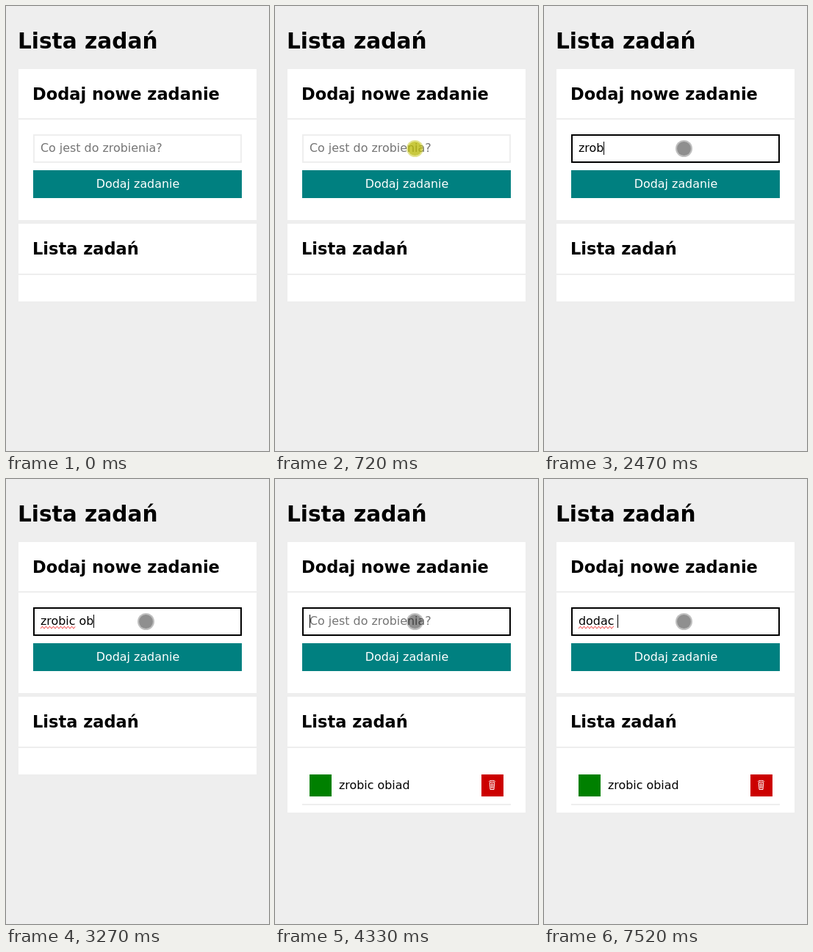
An HTML page with a canvas that plays this animation: 358x607 px, repeating every 7.99 s.

```html
<!DOCTYPE html>
<html lang="pl">
<head>
<meta charset="utf-8">
<title>Lista zadań</title>
<style>
  html, body { margin: 0; width: 100%; height: 100%; overflow: hidden; background: #eee; }
  canvas { display: block; width: 358px; height: 607px; }
</style>
</head>
<body>
<canvas id="stage"></canvas>
<script>
const W = 358, H = 607, LOOP = 7990;
const FOCUS = 790, ADDED = 4330;
const canvas = document.getElementById('stage');
const ratio = window.devicePixelRatio || 1;
canvas.width = W * ratio;
canvas.height = H * ratio;
const ctx = canvas.getContext('2d');
ctx.scale(ratio, ratio);

// [time, typed text, caret shown, spelling mark shown]
const typing = [
  [0, '', false], [FOCUS, '', true], [1320, '', false], [1850, 'z', true],
  [2120, 'zr', true], [2270, 'zro', true], [2470, 'zrob', true],
  [2540, 'zrobi', true], [2740, 'zrobic', true], [2790, 'zrobic ', true, true],
  [3000, 'zrobic o', true, true], [3270, 'zrobic ob', true, true],
  [3330, 'zrobic obi', true, true], [3470, 'zrobic obia', true, true],
  [4000, 'zrobic obia', false, true], [4130, 'zrobic obiad', true, true],
  [ADDED, '', true], [4600, '', false], [5130, '', true],
  [5460, 'd', true], [5570, 'do', true], [5680, 'dod', true],
  [5790, 'doda', true], [6270, 'doda', false], [6580, 'dodac', true],
  [7060, 'dodac', false], [7520, 'dodac ', true, true]
];

// Pointer positions while it glides up to the field
const path = [[215, 602], [215, 532], [213, 440], [210, 352], [203, 279],
              [193, 225], [191, 200], [190.5, 194.5]];
const STEP = 72;

function rect(x, y, w, h, color) {
  ctx.fillStyle = color;
  ctx.fillRect(x, y, w, h);
}

function setFont(size, weight = 400) {
  ctx.font = `${weight} ${size}px "DejaVu Sans", sans-serif`;
}

const bodyFont = () => setFont(15.9);

function text(str, x, y, color = '#000') {
  ctx.fillStyle = color;
  ctx.fillText(str, x, y);
}

function heading(str, x, y, size) {
  setFont(size, 700);
  text(str, x, y);
}

// Edges sit on whole pixels although the layout is fractional
function card(y, h, title) {
  const top = Math.round(y);
  rect(17, top, 324, h, '#fff');
  rect(17, Math.round(y + 67.5), 324, 2, '#eee');
  heading(title, 36, top + 42, 22.5);
}

function squiggle(x, y, width) {
  ctx.beginPath();
  for (let i = 0; i <= width; i += 0.5) {
    ctx.lineTo(x + i, y + 1.3 * Math.cos(i * Math.PI / 2.5));
  }
  ctx.strokeStyle = '#f02020';
  ctx.lineWidth = 1;
  ctx.stroke();
}

function field(t) {
  const [, typed, caret, marked] = typing.findLast(s => s[0] <= t);
  ctx.strokeStyle = t < FOCUS ? '#eee' : '#000';
  ctx.lineWidth = 2;
  ctx.strokeRect(38, 176, 282, 37);
  bodyFont();
  text(typed || 'Co jest do zrobienia?', 47, 199, typed ? '#000' : '#757575');
  if (marked) squiggle(47, 202.5, ctx.measureText(typed.split(' ')[0]).width);
  if (caret) rect(47 + Math.round(ctx.measureText(typed).width), 185, 1, 18, '#000');
}

function trash(x, y) {
  ctx.strokeStyle = '#fff';
  ctx.lineWidth = 1;
  ctx.beginPath();
  ctx.ellipse(x + 4.5, y + 1.5, 4, 1.2, 0, 0, 7);
  ctx.moveTo(x + 1.2, y + 3);
  ctx.lineTo(x + 2, y + 12.5);
  ctx.lineTo(x + 7, y + 12.5);
  ctx.lineTo(x + 7.8, y + 3);
  for (const dx of [3.5, 5.5]) {
    ctx.moveTo(x + dx, y + 4);
    ctx.lineTo(x + dx, y + 11);
  }
  ctx.stroke();
}

function task(label, y) {
  rect(47, y, 30, 30, '#008000');
  rect(281, y, 30, 30, '#c00');
  trash(291, y + 8);
  bodyFont();
  text(label, 87, y + 20);
  rect(37, y + 40, 284, 2, '#eee');
}

function disc(x, y, r, color) {
  ctx.fillStyle = color;
  ctx.beginPath();
  ctx.arc(x, y, r, 0, 7);
  ctx.fill();
}

function pointer(t) {
  if (t < 70) return;
  const step = Math.floor((t - 70) / STEP);
  const [x, y] = path[Math.min(path.length - 1, step)];
  const pressed = t >= FOCUS;
  disc(x, y, 11.5, pressed ? 'rgba(0,0,0,.25)' : 'rgba(190,190,0,.45)');
  disc(x, y, 9.5, pressed ? 'rgba(0,0,0,.25)' : 'rgba(180,180,0,.55)');
}

function draw(t) {
  rect(0, 0, W, H, '#eee');
  heading('Lista zadań', 16, 58, 29.6);
  card(85.6, 206, 'Dodaj nowe zadanie');
  field(t);
  rect(37, 224, 284, 38, '#008080');
  ctx.textAlign = 'center';
  text('Dodaj zadanie', 179.5, 248, '#fff');
  ctx.textAlign = 'left';
  card(297.4, t < ADDED ? 106 : 158, 'Lista zadań');
  if (t >= ADDED) task('zrobic obiad', 403);
  pointer(t);
}

const start = performance.now();
function tick() {
  draw((performance.now() - start) % LOOP);
  requestAnimationFrame(tick);
}
tick();
</script>
</body>
</html>
```
